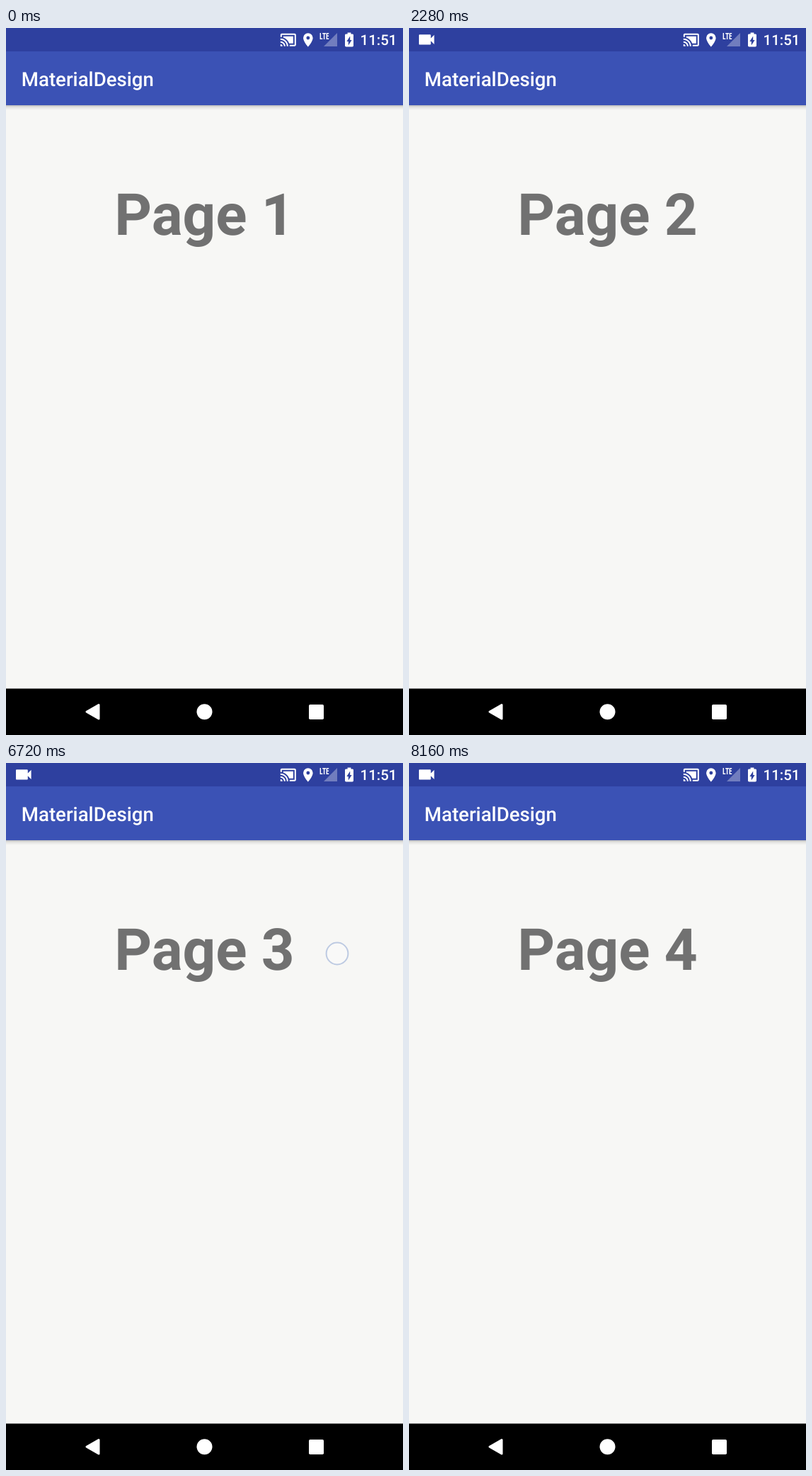
An HTML page that plays this animation: 561 by 998 pixels, repeating every 8240 ms.

```html
<!DOCTYPE html>
<html lang="en">
<head>
<meta charset="utf-8">
<title>Pager</title>
<style>
  html, body { margin: 0; width: 100%; height: 100%; overflow: hidden; background: #f7f7f5; }
  svg { display: block; width: 100%; height: 100%; font-family: Roboto, sans-serif; text-rendering: geometricPrecision; }
  #pages { font-size: 81.8px; font-weight: 700; fill: #717171; text-anchor: middle; }
  .bar { font-weight: 500; fill: #fff; }
</style>
</head>
<body>
<svg viewBox="0 0 561 998">
  <defs>
    <linearGradient id="shade" x2="0" y2="1">
      <stop offset="0" stop-color="#000" stop-opacity=".24"/>
      <stop offset=".4" stop-color="#000" stop-opacity=".08"/>
      <stop offset="1" stop-color="#000" stop-opacity="0"/>
    </linearGradient>
  </defs>
  <rect width="561" height="998" fill="#f7f7f5"/>
  <g id="pages"></g>

  <rect y="109" width="561" height="7" fill="url(#shade)"/>
  <rect y="33" width="561" height="76" fill="#3b52b5"/>
  <rect width="561" height="33" fill="#2e409f"/>
  <text class="bar" x="21.8" y="81.5" font-size="27.6">MaterialDesign</text>
  <text class="bar" x="500.6" y="24" font-size="20.4">11:51</text>

  <g fill="#fff">
    <path id="camera" d="M17 10.5V7c0-.55-.45-1-1-1H4c-.55 0-1 .45-1 1v10c0 .55.45 1 1 1h12c.55 0 1-.45 1-1v-3.5l4 4v-11l-4 4z"/>
    <path transform="translate(386.8 4.8)" d="M1 18v3h3c0-1.66-1.34-3-3-3zm0-4v2c2.76 0 5 2.24 5 5h2c0-3.87-3.13-7-7-7zm18-7H5v1.63c3.96 1.28 7.09 4.41 8.37 8.37H19V7zM1 10v2c4.97 0 9 4.03 9 9h2c0-6.08-4.93-11-11-11zm20-7H3c-1.1 0-2 .9-2 2v3h2V5h18v14h-7v2h7c1.1 0 2-.9 2-2V5c0-1.1-.9-2-2-2z"/>
    <path transform="translate(415.2 5.3) scale(.97)" d="M12 2a7 7 0 0 0-7 7c0 5.25 7 13 7 13s7-7.75 7-13a7 7 0 0 0-7-7zm0 9.5a2.5 2.5 0 0 1 0-5 2.5 2.5 0 0 1 0 5z"/>
    <path d="M468 7V26H449z" opacity=".32"/>
    <path d="M444.3 7V15.2H447.3M447.2 7.7H452M449.6 7.7V16M456.2 7.7H453.3V15.2H456.2M453.3 11.3H456" fill="none" stroke="#fff" stroke-width="1.4"/>
    <path transform="translate(470.6 4.4) scale(1.2 1)" d="M15.67 4H14V2h-4v2H8.33C7.6 4 7 4.6 7 5.33v15.33C7 21.4 7.6 22 8.33 22h7.33c.74 0 1.34-.6 1.34-1.33V5.33C17 4.6 16.4 4 15.67 4zM11 20v-5.5H9L13 7v5.5h2L11 20z"/>
  </g>

  <rect y="932.5" width="561" height="65.5"/>
  <g fill="#fff">
    <path d="M114 965.3L131 955.6V975z" stroke="#fff" stroke-width="3" stroke-linejoin="round"/>
    <circle cx="280.5" cy="965.3" r="11"/>
    <rect x="428" y="955" width="21" height="21" rx="1.8"/>
  </g>
  <circle id="touch" r="15.4" fill="#fff" fill-opacity=".3" stroke="#bdcae2" stroke-width="2"/>
</svg>
<script>
const LOOP = 8240, STEP = 40, WIDTH = 561, SLOP = 22, SETTLE = 600, FADE = 120;
const $ = id => document.getElementById(id);
const clamp = v => Math.max(0, Math.min(1, v));
const mix = (a, b, p) => a + (b - a) * p;
const flick = p => p ** 1.3;
const smooth = p => p * p * (3 - 2 * p);

// down, move, stop and up are times; from and to are finger positions
const swipes = [
  { down: 1520, move: 1580, stop: 1720, up: 1720, from: [459, 279], to: [190, 284], ease: flick },
  { down: 3320, move: 3360, stop: 3620, up: 3620, from: [462, 274], to: [110, 280], ease: flick },
  { down: 6720, move: 6720, stop: 7240, up: 7523, from: [468, 269], to: [0, 275], ease: smooth }
];

for (let i = 0; i < 4; i++)
  $('pages').innerHTML += `<text x="${WIDTH * (i + .5)}" y="291.7">Page ${i + 1}</text>`;

function finger(s, t) {
  const p = s.ease(clamp((t - s.move) / (s.stop - s.move)));
  return s.from.map((v, i) => mix(v, s.to[i], p));
}

// Each swipe drags past the slop, then settles on the next page.
function advance(s, t) {
  const dragged = Math.max(0, s.from[0] - finger(s, t)[0] - SLOP) / WIDTH;
  const u = clamp((t - s.up) / SETTLE);
  return mix(dragged, 1, 1 - (1 - u) ** 5);
}

function draw(now) {
  const t = Math.floor(now % LOOP / STEP) * STEP;

  const scroll = swipes.reduce((sum, s) => sum + advance(s, t), 0) * WIDTH;
  $('pages').setAttribute('transform', `translate(${-scroll} 0)`);

  const s = swipes.find(s => t >= s.down && t < s.up + FADE);
  $('touch').setAttribute('opacity', s ? 1 - clamp((t - s.up) / FADE) : 0);
  if (s) $('touch').setAttribute('transform', `translate(${finger(s, t)})`);

  const shown = clamp((t - 40) / 240), size = 1.2 * mix(.5, 1, shown);
  $('camera').setAttribute('opacity', shown);
  $('camera').setAttribute('transform', `translate(24.8 16.4) scale(${size}) translate(-12 -12)`);
  requestAnimationFrame(draw);
}
requestAnimationFrame(draw);
</script>
</body>
</html>
```
